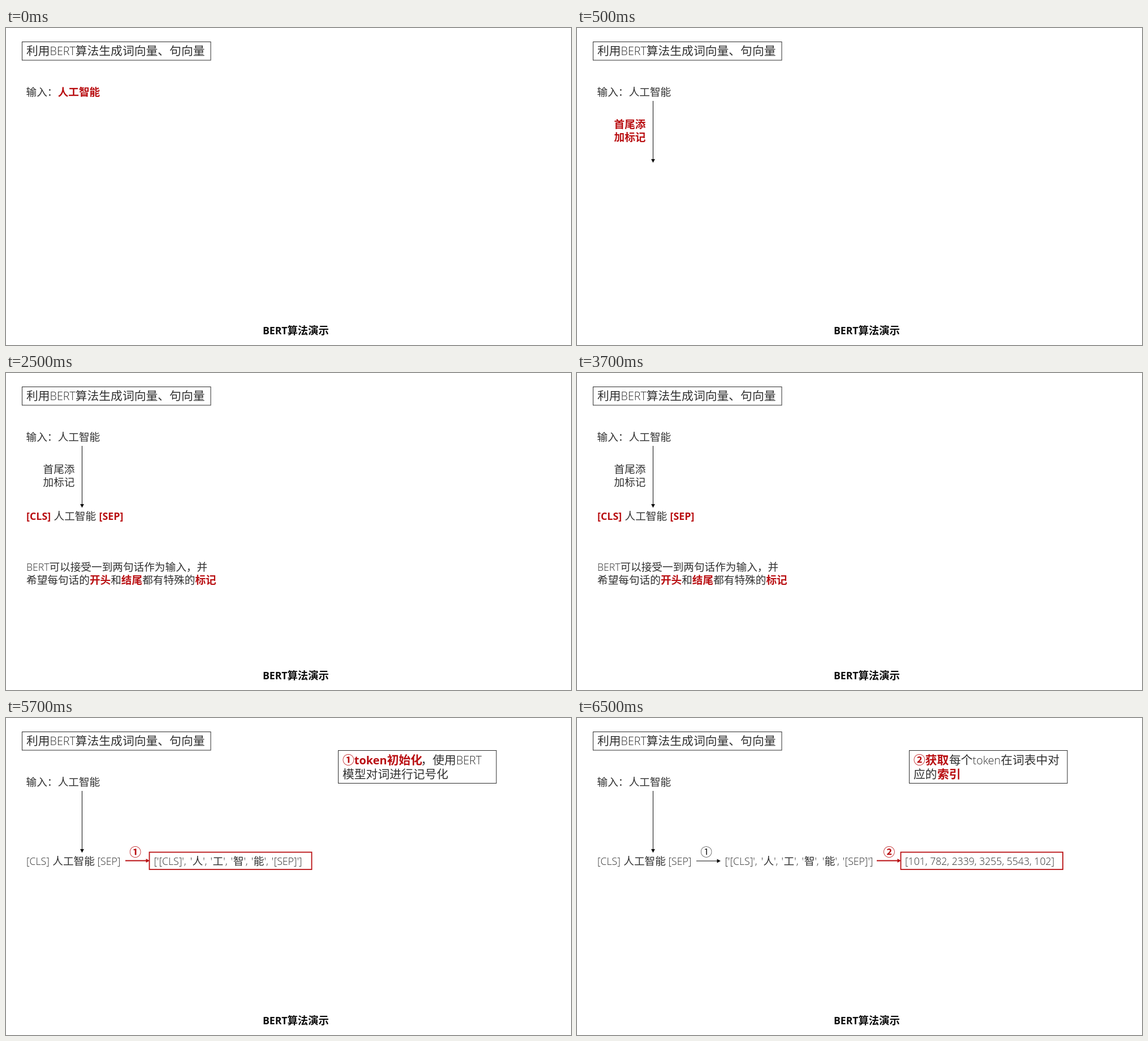
Recreate the animation shown at these times as an HTML page. Size 999 by 561 pixels, loop 8000 ms.

```html
<!DOCTYPE html>
<html lang="zh-CN">
<head>
<meta charset="utf-8">
<title>BERT算法演示</title>
<style>
  html, body { margin: 0; width: 100%; height: 100%; overflow: hidden; background: #fff; }
  svg { display: block; width: 100%; height: 100%; }
  text { font-family: "Noto Sans CJK SC", "Noto Sans CJK", sans-serif; font-weight: 300; white-space: pre; }
  .latin { font-family: "Open Sans", "Noto Sans", sans-serif; font-weight: 300; }
  .bold, .bold .latin { font-weight: 700; }
</style>
</head>
<body>
<svg id="stage" viewBox="0 0 999 561"></svg>
<script>
const BLACK = '#0c0c0c', INK = '#303030', LINE = '#2c2c2c', RED = '#b90f12';
const BIG = 20.8, BODY = 18.65, LOOP = 8000;
const starts = [0, 500, 2500, 4500, 6500];
const stage = document.getElementById('stage');
const parts = [];

function make(tag, attrs, parent) {
  const el = document.createElementNS('http://www.w3.org/2000/svg', tag);
  for (const k in attrs) el.setAttribute(k, attrs[k]);
  parent.appendChild(el);
  return el;
}

// A group visible from the first to the last step, inclusive
function group(first, last) {
  const el = make('g', {}, stage);
  parts.push({ el, first, last });
  return el;
}

// Latin runs are set slightly smaller than the Chinese characters
function write(g, x, y, str, { size = BODY, color = INK, bold = false } = {}) {
  const el = make('text', { x, y, fill: color, 'font-size': size }, g);
  if (bold) el.setAttribute('class', 'bold');
  for (const run of str.match(/[\x20-\x7e]+|[^\x20-\x7e]+/g)) {
    const latin = run.charCodeAt(0) < 127;
    const attrs = latin ? { class: 'latin', 'font-size': size * (bold ? 0.96 : 0.945) } : {};
    make('tspan', attrs, el).textContent = run;
  }
}

function box(g, x, y, width, height, stroke = LINE, w = 1) {
  make('rect', { x, y, width, height, fill: 'none', stroke, 'stroke-width': w }, g);
}

function arrow(g, x, y, length, angle, color = BLACK, w = 1) {
  const a = make('g', { transform: `translate(${x} ${y}) rotate(${angle})` }, g);
  make('path', { d: `M0 0H${length - 5}`, stroke: color, 'stroke-width': w }, a);
  make('path', { d: `M${length} 0l-6.5 -3.4v6.8z`, fill: color }, a);
}

const strong = { color: RED, bold: true };
const big = { size: BIG }, bigStrong = { size: BIG, ...strong };

// Title, caption, input
let g = group(0, 4);
box(g, 28.5, 24.5, 333.5, 32.5);
write(g, 36, 48.2, '利用BERT算法生成词向量、句向量', big);
write(g, 454, 541.7, 'BERT算法演示', { size: 18.35, color: BLACK, bold: true });
write(g, 35.5, 120.3, '输入：');
write(group(0, 0), 91.7, 120.3, '人工智能', strong);
write(group(1, 4), 91.7, 120.3, '人工智能');

// Adding the markers
arrow(group(1, 4), 134.5, 129, 109.5, 90);
for (const [step, style] of [[1, strong], [2, {}]]) {
  g = group(step, step);
  write(g, 65.5, 177, '首尾添', style);
  write(g, 65.5, 200, '加标记', style);
}

g = group(2, 2);
write(g, 36, 259.7, '[CLS]', strong);
write(g, 84.5, 259.7, '人工智能');
write(g, 164.5, 259.7, '[SEP]', strong);
write(g, 36, 350, 'BERT可以接受一到两句话作为输入，并');
[['希望每句话的'], ['开头', strong], ['和'], ['结尾', strong], ['都有特殊的'], ['标记', strong]]
  .reduce((x, [str, style]) => {
    write(g, x, 373, str, style);
    return x + str.length * BODY;
  }, 36);

// Tokens
g = group(3, 4);
write(g, 36, 259.7, '[CLS]');
write(g, 82.3, 259.7, '人工智能');
write(g, 161.5, 259.7, '[SEP]');
write(g, 261.5, 259.7, "['[CLS]',");
write(g, 325.8, 259.7, "'");
[...'人工智能'].forEach((ch, i) => {
  const x = 329.5 + i * 36.1;
  write(g, x, 259.7, ch);
  write(g, x + 18.7, 259.7, "',");
  write(g, x + 32, 259.7, "'");
});
write(g, 473.6, 259.7, "[SEP]']");
box(g, 587.5, 57.5, 279.5, 58);

g = group(3, 3);
arrow(g, 211, 252.5, 43, 0, RED, 1.8);
write(g, 218.3, 245, '①', bigStrong);
box(g, 253.5, 237.5, 287, 30.5, RED, 1.8);
write(g, 595, 81.5, '①token初始化', bigStrong);
write(g, 733.5, 81.5, '，使用BERT', big);
write(g, 595, 106.5, '模型对词进行记号化', big);

// Vocabulary indices
g = group(4, 4);
arrow(g, 211, 253, 43, 0);
write(g, 218.3, 245, '①', big);
arrow(g, 530, 252.5, 43, 0, RED, 1.8);
write(g, 541.5, 245, '②', bigStrong);
box(g, 572.5, 237.5, 286.5, 30.5, RED, 1.8);
write(g, 580, 259.7, '[101, 782, 2339, 3255, 5543, 102]');
write(g, 595, 81.5, '②获取', bigStrong);
write(g, 658, 81.5, '每个token在词表中对', big);
write(g, 595, 106.5, '应的', big);
write(g, 637, 106.5, '索引', bigStrong);

function draw() {
  const t = performance.now() % LOOP;
  const step = starts.filter(s => s <= t).length - 1;
  for (const p of parts) {
    p.el.setAttribute('display', step >= p.first && step <= p.last ? 'inline' : 'none');
  }
  requestAnimationFrame(draw);
}
draw();
</script>
</body>
</html>
```
